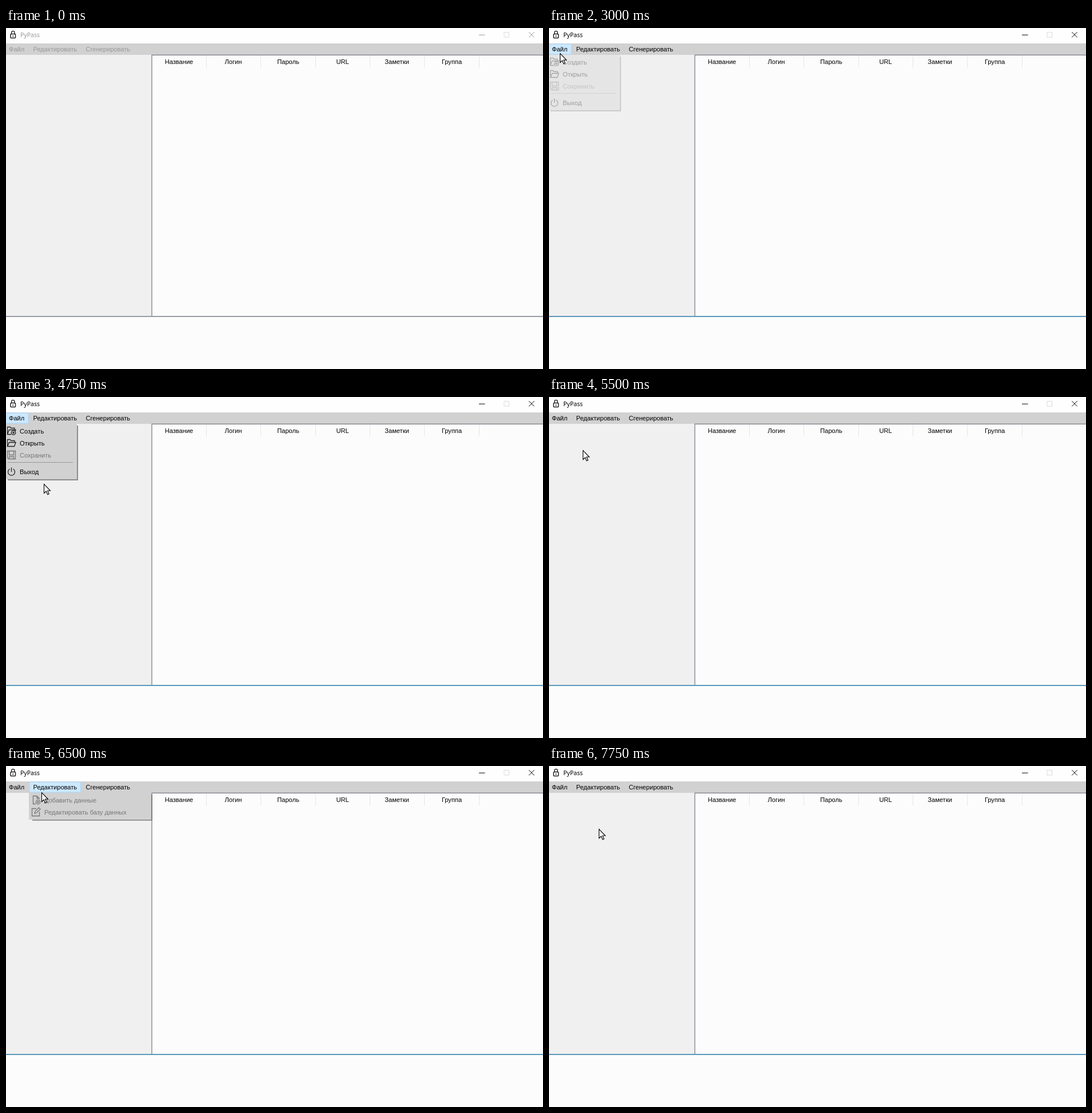
Recreate the animation shown at these times as an HTML page. Size 939 by 597 pixels, loop 8 s.

```html
<!DOCTYPE html>
<html lang="ru">
<head>
<meta charset="utf-8">
<title>PyPass</title>
<style>
  html, body { margin: 0; width: 100%; height: 100%; overflow: hidden; background: #fcfcfc; }
  svg { display: block; width: 100vw; height: 100vh; font: 11.1px "Liberation Sans", Arial, sans-serif; --ink: #000; --focus: #2478a6; }
  svg.inactive { --ink: #999; --focus: #797e88; }
  .title { font: 10.5px "Noto Sans", sans-serif; }
  .ink { fill: var(--ink); }
  .stroke { fill: none; stroke: var(--ink); }
  .border { fill: none; stroke: #797e88; stroke-width: 1.3; }
  .tab { fill: #cce8ff; stroke: #a8d8fa; }
  .header { text-anchor: middle; fill: #000; }
  .icon { fill: none; stroke: #222; stroke-width: 1.3; }
  .disabled { fill: #777; }
  .icon.disabled { fill: none; stroke: #777; }
  .hover { fill: #fff; }
</style>
</head>
<body>
<svg id="stage" viewBox="0 0 939 597">
  <rect width="939" height="597" fill="#fcfcfc"/>
  <rect width="939" height="27" fill="#fefefe"/>
  <rect y="27" width="939" height="20" fill="#d1d1d1"/>
  <rect y="47" width="254" height="457" fill="#f0f0f0"/>
  <path class="border" d="M255 504V47.4H939"/>
  <path d="M0 505H939" stroke="var(--focus)" stroke-width="1.3"/>

  <!-- Title bar -->
  <rect x="8" y="10.5" width="8.5" height="7" rx="1" fill="none" stroke="#222" stroke-width="1.5"/>
  <path d="M9.7 10V8a2.6 2.6 0 0 1 5.2 0V10M12.3 13v2.5" fill="none" stroke="#222" stroke-width="1.4"/>
  <text class="title ink" x="25" y="16">PyPass</text>
  <path class="stroke" d="M827 12.2H837.5M914.3 7L923.7 16.4M923.7 7L914.3 16.4"/>
  <rect x="871" y="7.5" width="8.5" height="8.5" fill="none" stroke="#dcdcdc"/>

  <!-- Menu bar -->
  <rect id="fileTab" class="tab" x="-.5" y="28" width="39.5" height="18"/>
  <rect id="editTab" class="tab" x="41" y="28" width="89.5" height="18"/>
  <g class="ink">
    <text x="5" y="41">Файл</text>
    <text x="47.5" y="41">Редактировать</text>
    <text x="139.5" y="41">Сгенерировать</text>
  </g>
  <g id="headers"></g>

  <g id="fileMenu">
    <path d="M3 145H125V50" fill="none" stroke="#8b8b8b" stroke-width="2"/>
    <rect y="47" width="124" height="97" fill="#d1d1d1"/>
    <g class="icon">
      <path d="M9 65.5H2.5V52.5H7L9 54.5H15V57.5M2.5 65L5.5 57.5H17L16 60"/>
      <circle cx="13" cy="62.5" r="3.7"/>
      <path d="M13 60.5V64.5M11 62.5H15"/>
      <path d="M2.5 86.5V74.5H7L9 76.5H15V79M2.5 86.5L5.5 79.5H17L14.5 86.5Z"/>
      <path d="M6.5 126A6 6 0 1 0 12.5 126M9.5 123.5V131"/>
    </g>
    <path class="icon disabled" d="M2.5 94.5H16.5V108.5H4.5L2.5 106.5ZM5.5 94.5V101.5H13.5V94.5M5.5 108V104.5H13.5V108"/>
    <path d="M3 114.5H117" stroke="#999"/>
    <text id="create" x="24" y="64">Создать</text>
    <text id="open" x="24" y="85">Открыть</text>
    <text class="disabled" x="24" y="106">Сохранить</text>
    <text id="exit" x="24" y="135">Выход</text>
  </g>

  <g id="editMenu">
    <path d="M46 94.5H255V50" fill="none" stroke="#7d7d7d" stroke-width="2"/>
    <rect x="40" y="47" width="214" height="47" fill="#d1d1d1"/>
    <g class="icon disabled">
      <path d="M52 66.5H47.5V52.5H54L58 56.5V58M54 52.5V56.5H58"/>
      <circle cx="56" cy="63" r="3.7"/>
      <path d="M56 61V65M54 63H58"/>
      <path d="M53 74.5H45.5V87.5H58.5V80M50 83L51 79.5 57.5 73 60 75.5 53.5 82Z"/>
    </g>
    <text class="disabled" x="67" y="64">Добавить данные</text>
    <text class="disabled" x="67" y="85">Редактировать базу данных</text>
  </g>

  <path id="cursor" d="M.5 .5V16.5L4.2 13 6.8 18.8 9.2 17.7 6.7 12H11.5Z" fill="#fff" stroke="#000" stroke-width="1.1"/>
</svg>
<script>
const LOOP = 8000, STEP = 250;
const $ = id => document.getElementById(id);
const show = (id, opacity) => $(id).setAttribute("opacity", Number(opacity));
const between = (v, from, to) => v >= from && v < to;

// Cursor stops: time, x, y
const path = [
  [1000, 325, 451], [1750, 153, 175], [2000, 82, 93], [2750, 19, 44],
  [3000, 19, 44], [3250, 14, 31], [3750, 34, 79], [4500, 63, 142],
  [4750, 66, 152], [5500, 59, 93], [6250, 62, 46], [6500, 62, 46],
  [7000, 80, 102], [7750, 87, 110]
];

$("headers").innerHTML = ["Название", "Логин", "Пароль", "URL", "Заметки", "Группа"].map((name, i) => {
  const right = Math.round(350 + i * 95.3);
  return `<text class="header" x="${right - 47.5}" y="63">${name}</text>
    <path d="M${right + .5} 48V69" stroke="#e6e6e6"/>`;
}).join("");

function cursorAt(t) {
  const next = path.findIndex(stop => stop[0] >= t);
  if (next < 1) return path[0].slice(1);
  const [t0, x0, y0] = path[next - 1], [t1, x1, y1] = path[next];
  const k = (t - t0) / (t1 - t0);
  return [x0 + (x1 - x0) * k, y0 + (y1 - y0) * k].map(Math.round);
}

function draw(now) {
  const t = Math.floor(now % LOOP / STEP) * STEP;
  const [x, y] = cursorAt(t);
  const fileOpen = between(t, 3000, 5000), editOpen = between(t, 6250, 7250);

  $("stage").classList.toggle("inactive", t < 3000);
  show("cursor", t >= 1000);
  $("cursor").setAttribute("transform", `translate(${x} ${y})`);
  show("fileTab", fileOpen);
  show("editTab", editOpen);
  show("fileMenu", fileOpen && (t === 3000 ? .35 : 1));
  show("editMenu", editOpen && (t === 6250 ? .5 : 1));
  for (const [id, top] of [["create", 49], ["open", 70], ["exit", 120]])
    $(id).classList.toggle("hover", between(y, top, top + 21));

  requestAnimationFrame(draw);
}
requestAnimationFrame(draw);
</script>
</body>
</html>
```
